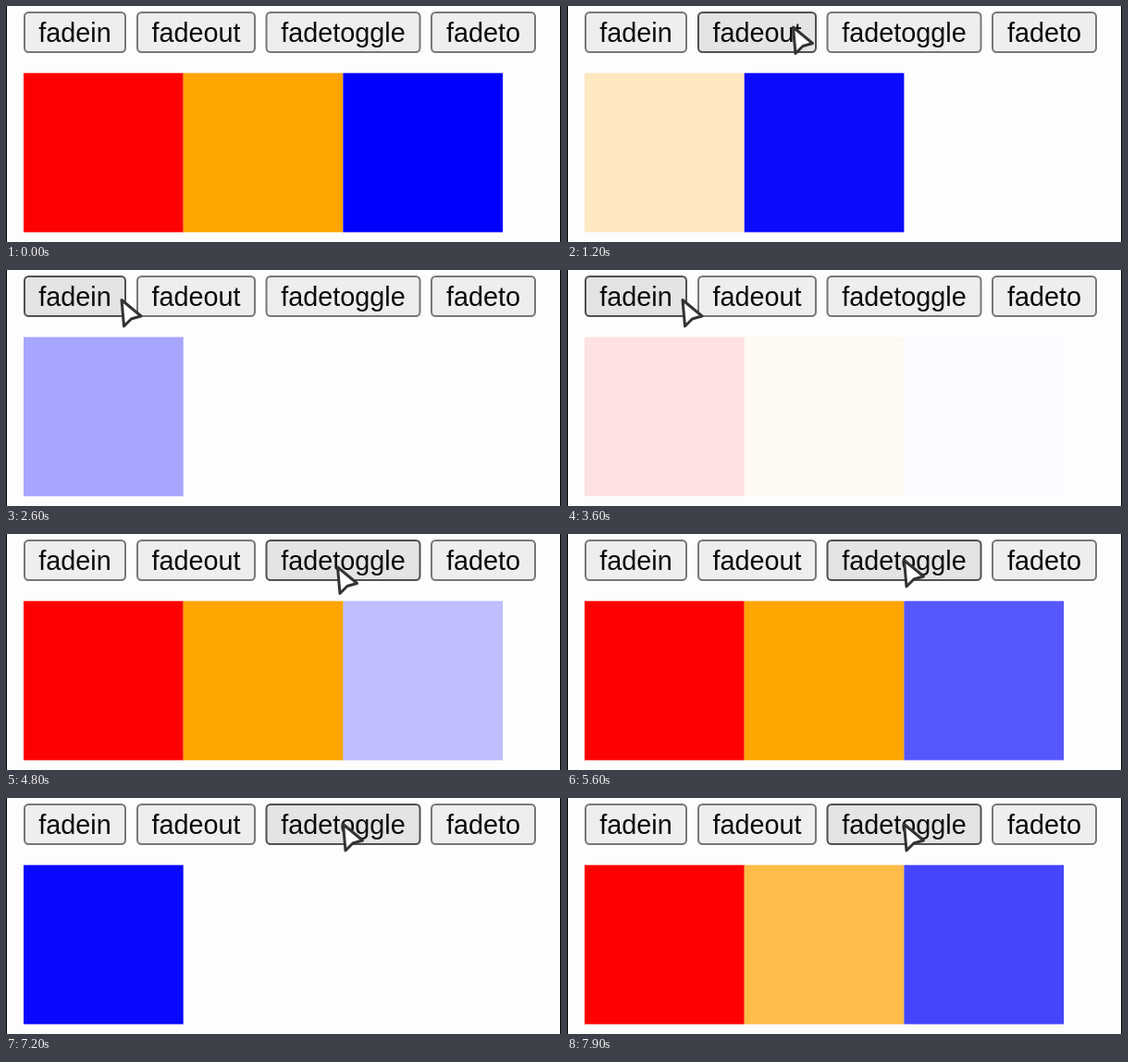
Write an HTML page with a canvas that moves like this. It is 600 px wide and 256 px high and loops after 8 s.

```html
<!DOCTYPE html>
<html>
<head>
<meta charset="utf-8">
<style>
  html, body { margin: 0; width: 600px; height: 256px; overflow: hidden; }
  canvas { display: block; }
</style>
</head>
<body>
<canvas id="stage" width="600" height="256"></canvas>
<script>
const ctx = document.getElementById('stage').getContext('2d');
const LOOP = 8000, SIZE = 172.7, LEFT = 19;

// label, left edge, right edge
const buttons = [
  ['fadein', 19, 130],
  ['fadeout', 141, 270],
  ['fadetoggle', 280.5, 448.5],
  ['fadeto', 459, 573]
];

// fades: start times, alternately out and in
const boxes = [
  { color: '#f00', duration: 400, fades: [800, 3515, 5870, 7517] },
  { color: '#ffa500', duration: 600, fades: [800, 3515, 5870, 7517] },
  { color: '#00f', duration: 3000, fades: [800, 3800, 6850] }
];

// pointer path: time, x, y
const path = [
  [450, 275, 70], [750, 243, 21],
  [1600, 243, 21], [2200, 123.5, 30.5],
  [3750, 123.5, 30.5], [4400, 357, 34],
  [5000, 357, 34], [5600, 363, 26.5]
];

const clamp = p => Math.min(1, Math.max(0, p));
const swing = p => 0.5 - Math.cos(Math.PI * clamp(p)) / 2;

// null means the box is out of the layout
function opacity({ duration, fades }, t) {
  const i = fades.findLastIndex(start => start <= t);
  if (i < 0) return 1;
  const p = (t - fades[i]) / duration;
  if (i % 2) return swing(p);
  return p < 1 ? 1 - swing(p) : null;
}

function pointer(t) {
  const i = path.findLastIndex(stop => stop[0] <= t);
  if (i < 0) return null;
  const [t0, x0, y0] = path[i];
  const [t1, x1, y1] = path[i + 1] || [LOOP, x0, y0];
  const k = swing((t - t0) / (t1 - t0));
  return { x: x0 + (x1 - x0) * k, y: y0 + (y1 - y0) * k };
}

function drawButton([label, left, right], mouse) {
  const hover = mouse && mouse.x > left && mouse.x < right && mouse.y < 51;
  ctx.beginPath();
  ctx.roundRect(left + 1, 7, right - left - 2, 43, 4.5);
  ctx.fillStyle = hover ? '#e4e3e6' : '#eeedef';
  ctx.fill();
  ctx.lineWidth = 2;
  ctx.strokeStyle = hover ? '#505050' : '#787878';
  ctx.stroke();
  ctx.fillStyle = '#0a0a0a';
  ctx.fillText(label, (left + right) / 2, 38.5);
}

function drawPointer({ x, y }) {
  ctx.save();
  ctx.translate(x, y);
  ctx.beginPath();
  ctx.moveTo(1.5, 2);
  ctx.lineTo(4, 30.5);
  ctx.lineTo(12, 22.5);
  ctx.lineTo(22.5, 19.5);
  ctx.closePath();
  ctx.lineJoin = 'round';
  ctx.lineWidth = 3;
  ctx.strokeStyle = '#333';
  ctx.fillStyle = '#fff';
  ctx.fill();
  ctx.stroke();
  ctx.restore();
}

function draw(t) {
  ctx.fillStyle = '#fefdfe';
  ctx.fillRect(0, 0, 600, 256);
  ctx.fillStyle = '#000';
  ctx.fillRect(0, 0, 1, 256);
  ctx.fillRect(599, 0, 1, 256);

  const mouse = pointer(t);
  ctx.font = '28.8px "Liberation Sans", Arial, sans-serif';
  ctx.textAlign = 'center';
  buttons.forEach(button => drawButton(button, mouse));

  let x = LEFT;
  for (const box of boxes) {
    const alpha = opacity(box, t);
    if (alpha === null) continue;
    ctx.globalAlpha = alpha;
    ctx.fillStyle = box.color;
    ctx.fillRect(x, 72.7, SIZE, SIZE);
    x += SIZE;
  }
  ctx.globalAlpha = 1;
  if (mouse) drawPointer(mouse);
}

function tick() {
  draw(performance.now() % LOOP);
  requestAnimationFrame(tick);
}
tick();
</script>
</body>
</html>
```
